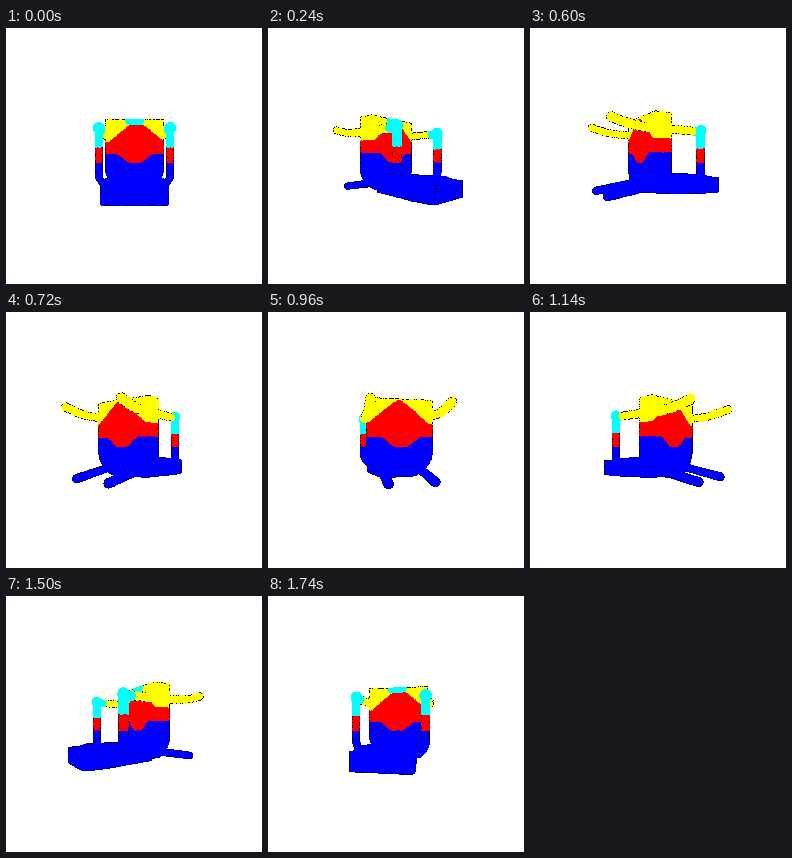
An HTML page with a canvas that plays this animation: 256x256 px, repeating every 1.8 s.

```html
<!DOCTYPE html>
<html lang="en">
<head>
<meta charset="utf-8">
<title>Turning model</title>
<style>
  html, body { margin: 0; width: 100%; height: 100%; overflow: hidden; background: #fff; }
  canvas { display: block; width: 100vw; height: 100vh; image-rendering: pixelated; }
</style>
</head>
<body>
<canvas id="stage" width="256" height="256"></canvas>
<script>
const SIZE = 256, CX = 128, CY = 132, DIST = 215;
const STEP_MS = 60, STEPS = 30, GAP = 0.6;

// ABGR words for the pixel buffer
const WHITE = 0xffffffff, BLACK = 0xff000000;
const YELLOW = 0xff00ffff, RED = 0xff0000ff, BLUE = 0xffff0000, CYAN = 0xffffff00;

const ctx = document.getElementById('stage').getContext('2d');
const image = ctx.createImageData(SIZE, SIZE);
const pixels = new Uint32Array(image.data.buffer);
const depth = new Float32Array(SIZE * SIZE);
const xs = [], ys = [], zs = [], colors = [];

const clamp = (v, lo, hi) => Math.max(lo, Math.min(hi, v));

function add(x, y, z, color) {
  xs.push(x); ys.push(y); zs.push(z); colors.push(color);
}

function ball(cx, cy, cz, r, paint) {
  for (let a = 0; a <= Math.PI; a += GAP / r) {
    const ring = r * Math.sin(a), y = cy + r * Math.cos(a);
    for (let b = 0; b < 2 * Math.PI; b += GAP / Math.max(ring, GAP)) {
      const z = cz + ring * Math.sin(b);
      add(cx + ring * Math.cos(b), y, z, paint(y, z));
    }
  }
}

// A tube along a path of u in 0..1; upright tubes have level rings.
function tube(path, length, rx, r, upright, paint) {
  const n = Math.ceil(length / GAP);
  for (let i = 0; i <= n; i++) {
    const [x, y, z] = path(i / n);
    for (let a = 0; a < 2 * Math.PI; a += GAP / r) {
      const p = rx * Math.cos(a), q = r * Math.sin(a);
      const py = upright ? y : y + q, pz = upright ? z + q : z;
      add(x + p, py, pz, paint(py, pz));
    }
  }
}

function plateColor(x, y, front) {
  const ax = Math.abs(x);
  if (front && ax < 10 - (y + 41) * 0.4 && y < -36) return CYAN;
  const k = clamp(1 - (ax - 5) / 15, 0, 1);
  if (y > -7 + 9 * k * k * (3 - 2 * k)) return BLUE;
  const hill = -40 + 0.85 * (Math.hypot(x - 2, 4) - 4);
  return y > Math.min(-19, hill) ? RED : YELLOW;
}

function inPlate(x, y) {
  const ax = Math.abs(x), r = 25, w = 30.5;
  if (ax > w || y < -41.5 || y > 30) return false;
  return ax < w - r || y < 30 - r || Math.hypot(ax - w + r, y - 30 + r) <= r;
}

function plate() {
  for (let y = -42; y <= 30; y += GAP) {
    for (let x = -33; x <= 33; x += GAP) {
      if (!inPlate(x, y)) continue;
      add(x, y, -4, plateColor(x, y, true));
      add(x, y, -20, plateColor(x, y, false));
      const inner = inPlate(x - GAP, y) && inPlate(x + GAP, y) &&
                    inPlate(x, y - GAP) && inPlate(x, y + GAP);
      if (!inner) for (let z = -20; z < -4; z += GAP) add(x, y, z, plateColor(x, y, false));
    }
  }
}

// Footprint of the base: wider at the front, with rounded corners
function inBase(x, z) {
  const r = 4, half = 19 + 6 * clamp((z + 10) / 60, 0, 1);
  const dx = Math.abs(x) - half + r, dz = Math.abs(z - 25) - 35 + r;
  return Math.hypot(Math.max(dx, 0), Math.max(dz, 0)) <= r;
}

function base() {
  for (let z = -10; z <= 60; z += GAP) {
    const top = 15 + 3 * clamp((z - 40) / 10, 0, 1);
    const bottom = 30 + 2.5 * clamp((z + 10) / 50, 0, 1);
    for (let x = -25; x <= 25; x += GAP) {
      if (!inBase(x, z)) continue;
      add(x, top, z, BLUE);
      add(x, bottom, z, BLUE);
      const inner = inBase(x - GAP, z) && inBase(x + GAP, z) &&
                    inBase(x, z - GAP) && inBase(x, z + GAP);
      if (!inner) for (let y = top; y < bottom; y += GAP) add(x, y, z, BLUE);
    }
  }
}

function side(sign) {
  const rodColor = (y, z) => z > 19 ? CYAN : YELLOW;
  const postColor = y => y < -11 ? CYAN : y < 2 ? RED : BLUE;
  const blue = () => BLUE;
  const rod = u => {
    const z = 28 - 86 * u, bend = Math.max(0, (-25 - z) / 35);
    return [31 * sign, -27 - 6 * bend * bend, z];
  };
  const post = u => {
    const y = -28 + 52 * u, bend = Math.max(0, (y - 12) / 12);
    return [(31 - 7 * bend * bend) * sign, y, 28];
  };
  const foot = u => [18 * sign, 21 + 7.5 * u, -8 - 49 * u];

  tube(rod, 90, 3.6, 3.6, false, rodColor);
  ball(...rod(1), 3.6, rodColor);
  ball(31 * sign, -28, 28, 4.8, () => CYAN);
  tube(post, 56, 3, 4, true, postColor);
  tube(foot, 52, 3.5, 3.5, false, blue);
  ball(...foot(1), 3.5, blue);
}

plate();
base();
side(-1);
side(1);

function speck(x, y, step, share) {
  const v = Math.sin(x * 12.9898 + y * 78.233 + step * 37.719) * 43758.5453;
  return v - Math.floor(v) < share;
}

function draw(step) {
  const a = step / STEPS * 2 * Math.PI, c = Math.cos(a), s = Math.sin(a);
  pixels.fill(WHITE);
  depth.fill(-1e9);
  for (let i = 0; i < xs.length; i++) {
    const z = zs[i] * c - xs[i] * s, k = DIST / (DIST - z);
    const px = Math.round(CX + (xs[i] * c + zs[i] * s) * k);
    const py = Math.round(CY + ys[i] * k);
    const at = py * SIZE + px;
    if (z > depth[at]) {
      depth[at] = z;
      pixels[at] = colors[i];
    }
  }
  // broken dark rim on the silhouette, fainter where one part hides another
  for (let y = 1; y < SIZE - 1; y++) {
    for (let x = 1; x < SIZE - 1; x++) {
      const at = y * SIZE + x;
      if (depth[at] < -1e8 || pixels[at] === CYAN) continue;
      const drop = depth[at] - Math.min(depth[at - 1], depth[at + 1], depth[at - SIZE], depth[at + SIZE]);
      const share = drop > 1e8 ? 0.5 : drop > 20 ? 0.3 : 0;
      if (speck(x, y, step, share)) pixels[at] = BLACK;
    }
  }
  ctx.putImageData(image, 0, 0);
}

const start = performance.now();
let shown = -1;

function tick() {
  const step = Math.floor((performance.now() - start) / STEP_MS) % STEPS;
  if (step !== shown) draw(shown = step);
  requestAnimationFrame(tick);
}
tick();
</script>
</body>
</html>
```
